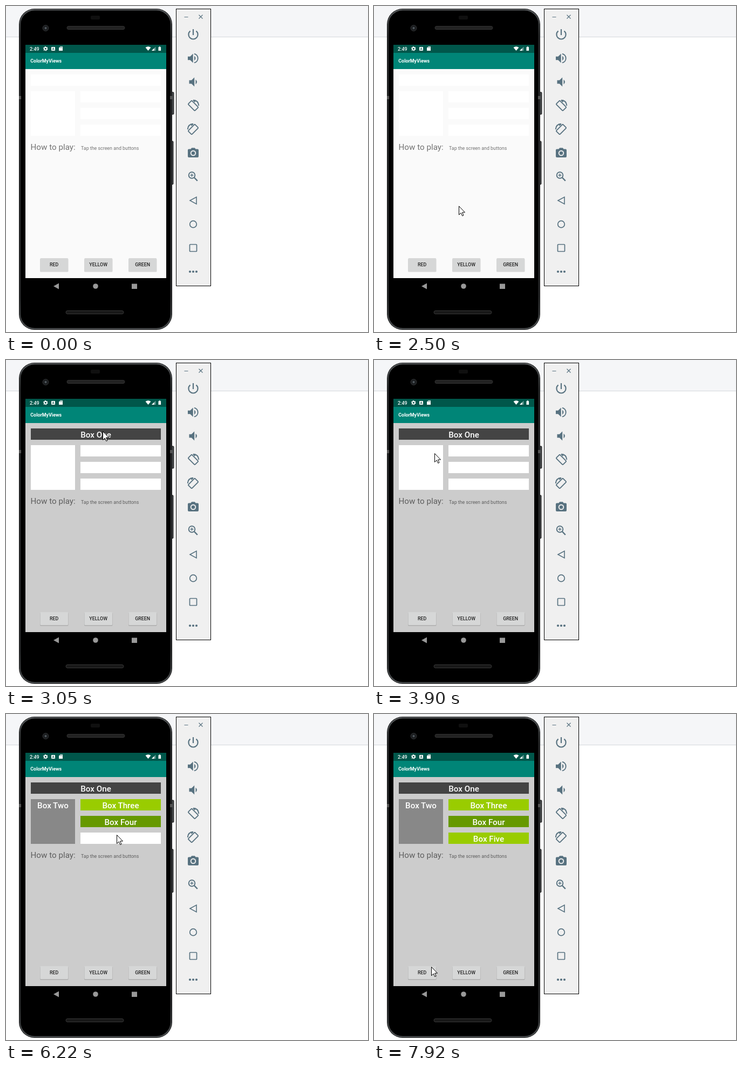
Animation, 671 px wide and 605 px high, one loop 8 s. Source, as an HTML page:

```html
<!DOCTYPE html>
<html lang="en">
<head>
<meta charset="utf-8">
<title>Tap the boxes</title>
<style>
  html, body { margin: 0; width: 100%; height: 100%; overflow: hidden; background: #fff; }
  svg { display: block; width: 100%; height: 100%; }
  text { font-family: Roboto, sans-serif; font-size: 8.9px; }
  .title { font-size: 15.2px; }
  .box text { font-size: 15.2px; font-weight: 500; fill: #fff; text-anchor: middle; }
  .button text { font-weight: 500; fill: #222; text-anchor: middle; }
  .line { fill: none; stroke: #587280; stroke-width: 1.9; }
  .solid { fill: #587280; }
</style>
</head>
<body>
<svg viewBox="0 0 671 605">
  <defs>
    <linearGradient id="rim" x2="0" y2="1">
      <stop offset="0" stop-color="#55585a"/>
      <stop offset=".08" stop-color="#2b2d2e"/>
      <stop offset=".9" stop-color="#2b2d2e"/>
      <stop offset="1" stop-color="#4b4e50"/>
    </linearGradient>
    <g id="rotate">
      <rect x="-4.8" y="-8.8" width="9.6" height="17.6" rx="1.4" transform="rotate(-45)" class="line"/>
      <path d="M0-10.3Q9.500-10 10.300 0M0-10.300l3.500 3.500" class="line" stroke-width="1.5"/>
    </g>
  </defs>

  <path d="M0 0H671V57H0Z" fill="#f5f6f8"/>
  <path d="M0 57.500H671" stroke="#d3d8dc"/>

  <g id="phone">
    <rect x="305" y="160" width="6" height="41" rx="1" fill="#4c4f51" stroke="#161616"/>
    <rect x="305" y="251" width="5" height="80" rx="1" fill="#4c4f51" stroke="#161616"/>
    <rect x="24" y="5" width="284" height="596" rx="29" fill="#080808"/>
    <rect x="26" y="7" width="280" height="592" rx="27" fill="#000" stroke="url(#rim)" stroke-width="2.500"/>
    <path d="M24 167h4v6h-4zM304 167h4v6h-4z" fill="#555"/>
    <circle cx="73.500" cy="41" r="5.500" fill="#1b1d1f" stroke="#303234"/>
    <circle cx="73.500" cy="41" r="2" fill="#50585e"/>
    <rect x="157" y="18" width="17" height="7" rx="2" fill="#101010"/>
    <rect x="113" y="37.500" width="107" height="6" rx="3" fill="#222" stroke="#333"/>
    <rect x="111" y="565.500" width="107" height="6" rx="3" fill="#181818" stroke="#373737"/>
    <g fill="#999">
      <path d="M88 520L98 514.500V525.500Z"/>
      <circle cx="166" cy="520" r="4.800"/>
      <path d="M233 515.500h10v9.500h-10z"/>
    </g>
  </g>

  <path id="screen" d="M36 117H297V505H36Z"/>
  <path d="M36 72H297V87H36Z" fill="#00574b"/>
  <path d="M36 87H297V117H36Z" fill="#008577"/>
  <g fill="#fff">
    <text x="44" y="82.500" font-weight="500" font-size="9">2:49</text>
    <circle cx="73.300" cy="79.300" r="2.400" fill="none" stroke="#fff" stroke-width="1.700"/>
    <circle cx="73.300" cy="79.300" r="3.700" fill="none" stroke="#fff" stroke-width="1.200" stroke-dasharray="1.900 1.975"/>
    <rect x="84" y="76" width="7" height="7" rx="1"/>
    <path d="M85.800 81.800L87.500 77.200L89.200 81.800M86.300 80.300h2.400" fill="none" stroke="#00574b" stroke-width=".8"/>
    <path d="M100.500 75.300H105V83H98V77.800Z"/>
    <path d="M100.500 76.300v1.500M102 76.300v1.500M103.500 76.300v1.500" stroke="#00574b" stroke-width=".7"/>
    <path d="M258.500 77Q263.500 73.500 268.500 77L263.500 83Z"/>
    <path d="M270 83L277.500 75.500V83Z" opacity=".4"/>
    <path d="M270 83L274.500 78.500V83Z"/>
    <path d="M282.500 76.200h1.300v-1h2v1h1.300V83h-4.600z"/>
    <text x="45.300" y="105.300" font-weight="700">ColorMyViews</text>
  </g>
  <g fill="#000" fill-opacity=".54">
    <text x="45.500" y="267" class="title">How to play:</text>
    <text x="139" y="266.700">Tap the screen and buttons</text>
  </g>
  <g id="boxes"></g>
  <g id="buttons"></g>

  <rect x="315.500" y="5.500" width="64" height="514" fill="#f0f0f0" stroke="#000"/>
  <path d="M330.500 20.500h7M357.500 16.500l7 7m0-7l-7 7" class="line" style="stroke-width:1.200"/>
  <g transform="translate(347 53)" class="line" style="stroke-width:2.200">
    <path d="M-5.500-6.700A8.600 8.600 0 1 0 5.500-6.700M0-10V1"/>
  </g>
  <g transform="translate(347 97)">
    <path d="M-10-3.200h4.300l5.400-5.300V8.500L-5.700 3.200H-10ZM2-4.500Q7 0 2 4.500Z" class="solid"/>
    <path d="M2-8.300A8.500 8.500 0 0 1 2 8.300" class="line"/>
  </g>
  <path d="M339.500 137.800h4.300l5.400-5.300v17l-5.400-5.300h-4.300ZM351.500 136.500q5 4.500 0 9Z" class="solid"/>
  <use href="#rotate" transform="translate(347 185)"/>
  <use href="#rotate" transform="translate(347 229) scale(-1 1)"/>
  <path d="M339 265.500h3.300l1.900-2.200h5.600l1.900 2.200H355q2 0 2 2V279q0 2-2 2H339q-2 0-2-2V267.500q0-2 2-2Z" class="solid"/>
  <circle cx="347" cy="273" r="4.300" fill="#587280" stroke="#f0f0f0" stroke-width="1.900"/>
  <g class="line">
    <circle cx="344.500" cy="314" r="5.800"/>
    <path d="M349 318.500l5.800 6" stroke-width="2.500"/>
    <path d="M341.500 314h6M344.500 311v6" stroke-width="1.300"/>
    <path d="M341 361L353 354.500V367.500Z" stroke-width="1.600"/>
    <circle cx="347" cy="405" r="6.300" stroke-width="1.700"/>
    <rect x="340.500" y="442.500" width="13" height="13" rx="1" stroke-width="1.700"/>
  </g>
  <path d="M341 493h0M347 493h0M353 493h0" stroke="#587280" stroke-width="4.200" stroke-linecap="round"/>

  <g id="cursor">
    <g id="click" fill="none">
      <circle r="10.500" stroke="#000"/>
      <circle r="9.500" stroke="#fff"/>
    </g>
    <path d="M.5.500V16.500L4.200 13L6.700 18.500L9 17.500L6.600 12H11.500Z" fill="#fff" stroke="#000"/>
  </g>
</svg>
<script>
const LOOP = 8000;
const byId = id => document.getElementById(id);

const boxes = [
  { label: 'One', x: 46, y: 127, w: 241, h: 21, color: '#444', at: 3050 },
  { label: 'Two', x: 46, y: 158, w: 82, h: 83, color: '#888', at: 3980 },
  { label: 'Three', x: 138, y: 158, w: 149, h: 21, color: '#9c0', at: 4840 },
  { label: 'Four', x: 138, y: 189, w: 149, h: 21, color: '#690', at: 5680 },
  { label: 'Five', x: 138, y: 220, w: 149, h: 21, color: '#9c0', at: 6770 },
];
const clicks = [[2270, 2500], [2880, 3050], [3750, 3900], [4670, 4840], [5530, 5680], [6620, 6770]];

// The pointer hops in even time steps from one resting place to the next.
const origin = { x: 505, y: 572 };
const moves = [
  { from: 576, to: 1110, steps: 8, x: 192, y: 443 },
  { from: 1570, to: 2040, steps: 7, x: 157, y: 371 },
  { from: 2570, to: 2730, steps: 3, x: 179, y: 132 },
  { from: 3200, to: 3675, steps: 7, x: 112, y: 173 },
  { from: 4055, to: 4440, steps: 6, x: 192, y: 164 },
  { from: 4990, to: 5455, steps: 7, x: 203, y: 199, power: 0.6 },
  { from: 5910, to: 6380, steps: 7, x: 206, y: 239, power: 0.85 },
  { from: 7070, to: 7300, steps: 4, x: 122, y: 385 },
  { from: 7620, to: 7920, steps: 5, x: 106, y: 469, bend: 31 },
];

byId('boxes').innerHTML = boxes.map(({ label, x, y, w, h }) => `<g class="box">
  <rect x="${x}" y="${y}" width="${w}" height="${h}"/>
  <text x="${x + w / 2}" y="${y + 16.5}">Box ${label}</text></g>`).join('');

byId('buttons').innerHTML = ['RED', 'YELLOW', 'GREEN'].map((label, i) => {
  const x = 63.5 + 82 * i;
  return `<g class="button">
    <rect x="${x - 0.5}" y="469" width="52.500" height="24.500" rx="1.500" fill-opacity=".15"/>
    <rect x="${x}" y="468" width="51.500" height="24" rx="1.300" fill="#d6d7d7"/>
    <text x="${x + 25.7}" y="483">${label}</text></g>`;
}).join('');

function pointerAt(t) {
  let pos = origin;
  for (const { from, to, steps, x, y, power = 0.9, bend = 0 } of moves) {
    if (t < from) break;
    const step = Math.min(steps, Math.floor((t - from) * (steps - 1) / (to - from) + 1e-6) + 1);
    const p = step / steps;
    const eased = p ** power;
    const swing = p < 1 ? bend * Math.sin(Math.PI * p) : 0;
    pos = { x: pos.x + (x - pos.x) * eased + swing, y: pos.y + (y - pos.y) * eased };
  }
  return pos;
}

function draw(t) {
  byId('screen').setAttribute('fill', t < 2570 ? '#fafafa' : '#ccc');
  document.querySelectorAll('.box rect').forEach((rect, i) =>
    rect.setAttribute('fill', t < boxes[i].at ? '#fff' : boxes[i].color));

  const { x, y } = pointerAt(t);
  byId('cursor').setAttribute('transform', `translate(${Math.round(x)} ${Math.round(y)})`);
  byId('cursor').style.display = t < 500 ? 'none' : '';
  byId('click').style.display = clicks.some(([on, off]) => t >= on && t < off) ? '' : 'none';
}

const start = performance.now();
function tick() {
  draw((performance.now() - start) % LOOP);
  requestAnimationFrame(tick);
}
tick();
</script>
</body>
</html>
```
